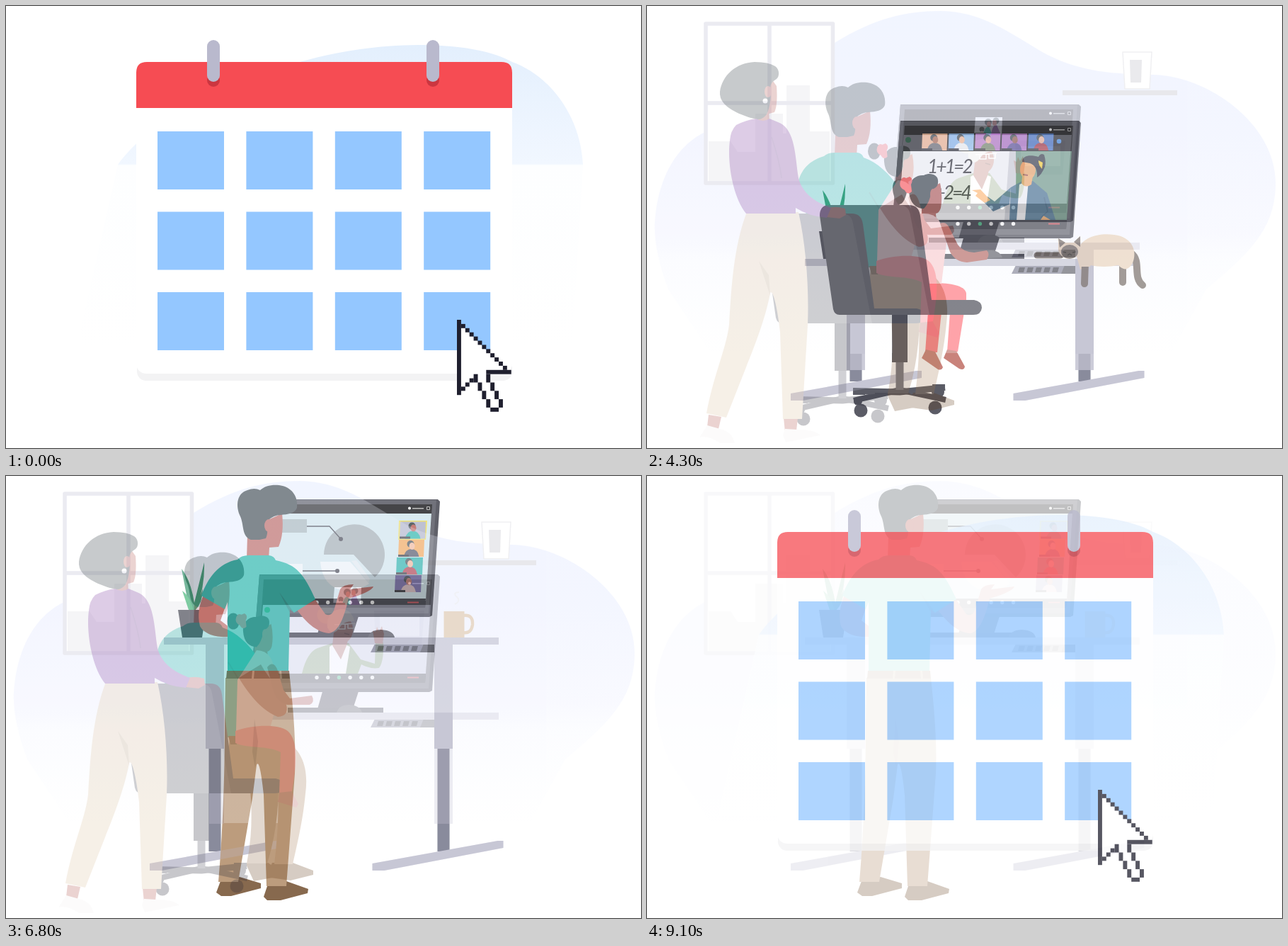
These frames come from a looping animation (897x624 px, 9.2 s). An HTML page:

```html
<!DOCTYPE html>
<html lang="en">
<head>
<meta charset="utf-8">
<title>Calendar and desk scenes</title>
<style>
html, body { margin: 0; width: 100%; height: 100%; overflow: hidden; background: #fff; }
svg { display: block; width: 897px; height: 624px; }
text { font: italic 26.5px Lato, "Open Sans", sans-serif; letter-spacing: -3px; }
</style>
</head>
<body>
<svg id="stage" viewBox="0 0 897 624" xmlns="http://www.w3.org/2000/svg"></svg>
<script>
const ink = '#252633', slate = '#44454f', hair = '#263238', skin = '#b3524c', steel = '#bcbbcd',
  iron = '#6f7186', teal = '#04ab9c', rose = '#ff5d66', pink = '#f9c6c9', tan = '#a67c52',
  brown = '#603813', sand = '#ddc4a4', purple = '#7c3a9e', fur = '#5b5049', coat = '#e6ccb0';

const P = (d, fill) => `<path d="${d}" fill="${fill}"/>`;
const L = (d, stroke, w, cap = 'butt') =>
  `<path d="${d}" fill="none" stroke="${stroke}" stroke-width="${w}" stroke-linecap="${cap}" stroke-linejoin="round"/>`;
const R = (x, y, w, h, fill, r = 0) =>
  `<rect x="${x}" y="${y}" width="${w}" height="${h}" rx="${r}" fill="${fill}"/>`;
const E = (x, y, rx, ry, fill) => `<ellipse cx="${x}" cy="${y}" rx="${rx}" ry="${ry}" fill="${fill}"/>`;
const C = (x, y, r, fill) => E(x, y, r, r, fill);
const G = (transform, body) => `<g transform="${transform}">${body}</g>`;
const move = (x, y, body) => G(`translate(${x} ${y})`, body);
const fade = (id, stops) =>
  `<linearGradient id="${id}" gradientUnits="userSpaceOnUse" x1="0" y1="0" x2="0" y2="500">` +
  stops.map(([y, c]) => `<stop offset="${y / 500}" stop-color="${c}"/>`).join('') + '</linearGradient>';

const defs = '<defs>' +
  fade('sky', [[55, '#e3effd'], [130, '#eaf3fe'], [223, '#f1f7ff'], [225, '#fdfeff'], [480, '#fff']]) +
  fade('wall', [[7, '#eff3ff'], [180, '#f1f4ff'], [320, '#f7f8ff'], [360, '#fbfcff'], [490, '#fff']]) + '</defs>';

// ---- calendar ----
function cursor() {
  const u = 5.9, cells = [[0, 0, 1, 18], [7, 12, 6, 1], [7, 13, 1, 2], [8, 15, 1, 2], [9, 17, 1, 2],
    [10, 19, 1, 2], [8, 21, 2, 1], [7, 19, 1, 2], [6, 17, 1, 2], [5, 15, 1, 2], [4, 13, 1, 2],
    [3, 14, 1, 1], [2, 15, 1, 1], [1, 16, 1, 1]];
  for (let i = 1; i < 12; i++) cells.push([i, i, 1, 1]);
  return move(637, 443, P('M3 3L71 73H44V88L62 124H45L27 77L3 100Z', '#fff') +
    cells.map(c => R(...c.map(n => +(n * u).toFixed(1)), '#1f1f2e')).join(''));
}

function calendar() {
  let s = P('M158 224C200 165 300 110 415 79C480 60 540 55 590 55C650 56 690 65 715 79C768 98 812 155 815 225L800 480H100Z', 'url(#sky)') +
    R(185, 480, 530, 49, '#f3f3f4', 13) + R(184, 79, 531, 440, '#fff', 14) +
    P('M184 144V94Q184 79 199 79H700Q715 79 715 94V144Z', '#f64c53');
  for (const x of [293, 603]) s += C(x, 105, 9, '#cb3640') + R(x - 9, 48, 18, 59, '#b9b9cd', 9);
  for (let i = 0; i < 12; i++)
    s += R(214 + i % 4 * 125.4, 177 + Math.floor(i / 4) * 113.5, 94, 82, '#94c7ff');
  return s + cursor();
}

// ---- shared room ----
const room = () =>
  P('M11 305C15 240 45 195 82 178C150 150 210 85 265 52C320 18 365 7 415 7C470 8 505 33 555 63C610 95 665 96 715 97C790 98 888 165 888 250C888 315 850 350 790 400L740 490H90L30 400Q9 345 11 305Z', 'url(#wall)') +
  R(83, 25, 180, 226, '#fff') +
  P('M87 250V191H118L128 206H153V152H192V180H197V112H230V177H258V250Z', '#f4f4f6') +
  L('M83 25H262.5V250H83ZM173 25V250M83 137H262', '#e7e7ef', 5.5) +
  R(587, 119, 162, 7, '#e4e4e9') + P('M672 65H713L710 117H675Z', '#fff') +
  L('M672 65H713L710 117H675Z', '#ededf0', 1.5) + P('M682 76H699L698 108H683Z', '#e6e6ea');

// The parts below are drawn for a desk top at y = 357 and shifted to fit.
const plant = () =>
  P('M259 318L248 260Q261 276 266 308L280 251Q281 285 270 312L278 288Q278 308 267 319Z', '#0d8050') +
  P('M258 318L249 291Q261 300 265 319Z', '#1da65d') + P('M243 318H283L277 357H249Z', ink);

function desk(y) {
  const end = y + 157;
  let s = '';
  for (const x of [282, 605])
    s += R(x + 4.5, end, 17, 530 - end, iron) + R(x, y + 9, 26, 148, steel);
  for (const x of [203, 517.5])
    s += P(`M${x} 547L${x + 177} 515H${x + 185}V525L${x + 17} 557H${x}Z`, steel);
  let tray = P('M521 366H605V378H515Z', iron) + P('M590 366H605V378H585Z', slate);
  for (let i = 0; i < 5; i++) tray += P(`M${526 + i * 12} 369h8l-2 7h-8Z`, ink);
  return s + move(0, y - 357, tray + plant()) + R(223, y, y === 357 ? 465 : 473, 10, steel);
}

function monitor(y, screen) {
  let s = P('M448 324H499L490 352H440Z', '#2b2b38') + R(398, 350, 135, 7, ink) +
    P('M358 162H610L613 165L602 326L598 328H345Z', '#2a2b38') +
    P('M358 163H608L597 323H345Z', '#42434f') + P('M364 169H602L592 315H354Z', '#08080b') + screen +
    P('M357 302H593L592 315H354Z', '#20212c');
  for (let i = 0; i < 6; i++) s += C(439 + i * 15.7, 307.5, 2.7, i === 2 ? '#2fb573' : '#eee');
  s += R(567, 306.5, 16, 2, '#c8323d') + C(570, 174.5, 2, '#fff') + R(574, 174, 16, 1.5, '#aaa') +
    L('M594.5 172.5H598.5V176.5H594.5Z', '#aaa', 1);
  return move(0, y - 357, s);
}

function bust(x, y, w, bg, shirt, face = skin, top = hair) {
  return move(x, y, P(`M1 0H${w}L${w - 1} 24H0Z`, bg) +
    P(`M${w / 2 - 11} 24Q${w / 2 - 8} 13 ${w / 2} 13Q${w / 2 + 9} 13 ${w / 2 + 11} 24Z`, shirt) +
    C(w / 2 - 1, 6, 5, top) + E(w / 2 + 1, 9, 4, 5, face) + R(0, 21, 15, 3, '#17171f'));
}

const chair = () =>
  L('M291 543.5L357 545L421 538.5', ink, 9) + L('M292 557L357 542L422 556', ink, 8) +
  R(403, 534, 18, 9, ink) + R(291, 540, 17, 9, ink) +
  C(302, 571, 9.5, ink) + C(407, 567, 9.5, ink) + C(411, 545, 9, ink) + C(298, 558, 6, ink) +
  R(351.5, 500, 11, 42, '#4b4c5a') + R(346, 434, 22, 69, ink) +
  P('M350 281H370Q384 281 386 296L402 415H462Q473 417 473 426Q472 436 461 436H380Z', ink) +
  P('M256 281H358Q370 282 372 295L399 436H272Q265 436 263 428L244 296Q244 282 256 281Z', slate);

const girlHead = () =>
  P('M388 278L398 258L414 250Q418 268 415 285Q413 292 408 293L409 305H388Z', skin) +
  P('M370 262C369 246 380 238 391 239C401 234 411 239 411 246Q412 255 405 258C400 261 402 275 391 286C380 286 371 278 370 262Z', hair) +
  E(404, 266, 4, 8, skin);
const bow = () =>
  P('M358 247Q361 240 366 243L371 241Q377 244 373 252L374 262Q368 268 364 260Q355 256 358 247Z', '#f8555d');
const ponytail = () =>
  P('M350 247C361 240 369 248 368 258C366 270 362 281 355 280C346 268 345 252 350 247Z', hair);

const manHead = () =>
  P('M341 84L370 62L390 53Q393 82 385 100L372 101L371 118H340Z', skin) +
  P('M346 90C332 85 337 68 330 55C324 40 327 24 341 20Q351 16 359 20C366 13 380 11 391 14C405 18 413 30 411 45C408 53 398 54 388 55Q378 55 370 63C368 72 371 80 367 88L358 90Z', hair) +
  E(371, 70, 6, 9, skin);

// ---- lesson ----
function lessonScreen() {
  const cells = [['#f3b085', '#59595f', '#a85c3e'], ['#7db3f0', '#eef2fa', '#f4b08d'], ['#b067c2', '#5b6d55', '#f0a58a'],
    ['#a861c0', '#4a3d8c', '#8a4a3a'], ['#2f62bd', '#a1202c', '#f0b090']];
  return P('M362 205H521V302H355Z', '#fff') + P('M512 205H521V302H505Z', '#d4d5da') +
    P('M521 205H600L593 302H521Z', '#6a9a83') +
    cells.map((c, i) => bust(388 + i * 37.5, 180, 36.5, ...c)).join('') + C(582, 191, 3.3, '#2b7de0') +
    '<text x="396" y="236" fill="#17171d">1+1=2</text><text x="394" y="273" fill="#17171d">2+2=4</text>' +
    P('M512 302L514 256L530 247H545L565 264L577 302Z', '#3d6c8c') + P('M526 252L539 246L534 302H522Z', '#fff') +
    P('M514 256L512 280L489 290L474 275L481 269L491 276Z', '#3d6c8c') +
    P('M485 274L471 259L459 260L467 264L464 268L477 278ZM531 234H546L543 252Q534 258 529 250ZM556 302L560 296L570 302Z', '#fdad62') +
    L('M561 270L566 290L556 299', '#2f587a', 1.5) + E(538, 231, 11, 14, '#fdad62') +
    P('M530 220C530 210 543 210 553 213Q556 207 561 210Q564 220 562 227Q557 239 551 242Q552 226 541 222Z', '#1f2633') +
    P('M553 218L559 221L558 230Q553 225 553 218Z', '#ffd21f') + L('M531 238L538 239', '#9c4238', 2);
}

const cat = () =>
  L('M685 350C698 360 686 384 700 394', fur, 10, 'round') + L('M672 358L672 390', fur, 10, 'round') +
  P('M606 350C612 325 640 320 660 323C685 326 692 345 687 360C683 371 675 376 666 366Q645 370 626 366L612 372Z', coat) +
  L('M619 362L618 392', fur, 10, 'round') + P('M612 352Q620 340 630 352L626 368H613Z', coat) +
  L('M551 352H584', fur, 9, 'round') + P('M581 328L591 334H603L612 325L613 348Q606 357 595 357Q584 355 581 345Z', coat) +
  P('M581 328L591 334L583 341ZM612 325L603 333L612 340Z', fur) + E(597, 347, 12, 10, fur) +
  L('M587 347L592 348M601 348L606 347M594 352L597 350L600 352', '#29231f', 1.3);

const lesson = () => room() + monitor(357, lessonScreen()) + desk(357) + cat() +
  P('M397 432H416L410 489H393ZM428 432H448L439 488H424Z', rose) +
  P('M394 485L407 488L418 510Q416 515 411 513L388 497ZM424 485L437 487L449 509Q448 515 441 512L419 497Z', '#b85a50') +
  P('M392 392C425 389 450 394 451 406V418H392Z', rose) +
  ponytail() + girlHead() + bow() + P('M380 294Q403 290 412 302L424 326L416 392H396Z', pink) +
  P('M470 357Q472 345 487 345Q499 346 502 355Z', slate) +
  P('M414 307Q423 303 428 315L439 337Q446 347 462 348L480 345Q485 350 480 358L452 362Q435 361 428 347Z', '#a94f49') + chair();

// ---- family call ----
const familyScreen = () =>
  P('M363 205H600L593 302H355Z', '#c3c5dc') + P('M520 213H591L587 261H522Z', '#b4b7d1') + R(528, 221, 56, 28, '#cfd1e4') +
  P('M464 180H502L501 205H462Z', '#dfe4f2') + C(473, 197, 3.5, hair) + C(482, 187, 5, hair) + C(493, 185, 4.5, hair) +
  P('M475 205Q477 193 483 193L488 205Z', teal) + P('M486 205Q488 190 494 191L500 205Z', purple) +
  E(483, 190, 3, 4, skin) + E(491, 188, 3, 4, skin) + P('M467 205L473 199L479 205Z', pink) + R(462, 202, 17, 3, '#17171f') +
  C(369, 212, 4, '#16a660') +
  P('M418 302Q425 272 440 266L461 259H484L501 282L521 288L522 258H533Q534 285 527 294Q515 296 502 289L497 302Z', '#708c5e') +
  P('M457 264L469 257L486 264L480 302H457Z', '#fff') + P('M461 262L463 244H484L482 260L473 282Z', '#a95d55') +
  P('M521 259L518 241L522 243L524 236L527 242L531 235L534 246L532 260Z', '#a95d55') + E(477, 240, 13, 18, '#a95d55') +
  C(452, 219, 12.5, '#d7d7d7') + P('M454 237C452 217 466 209 478 211Q490 215 492 228Q478 227 472 236Q465 247 457 242Z', '#e5e5e5') +
  L('M464 233L494 231M470 233V239H479V232M483 232V238H492V231', '#fff', 1.5) + L('M478 245L485 247', '#68332f', 1.5);

const woman = () =>
  P('M87 577L105 580L101 597L85 594ZM193 581H213L211 600L195 602Z', skin) +
  P('M85 592L103 597Q120 600 124 617H103Q86 606 74 609ZM195 597L212 598Q238 598 245 606L216 612L196 616L192 606Z', '#f4f3f3') +
  P('M141 291H214C225 340 229 400 227 450L219 583H192L188 460C184 425 178 400 174 405C168 440 150 485 140 510L112 581L84 575C94 520 112 484 116 450C119 400 122 340 141 291Z', sand) +
  P('M158 360L172 380L174 409Z', '#bea684') + P('M153 144H172L173 164H152Z', skin) +
  P('M176 103L183 113Q185 139 180 150L169 153V127Z', skin) +
  P('M103 121C106 98 126 80 152 79Q172 79 181 85C188 90 187 100 183 103Q174 108 174 116C176 126 174 143 169 153Q163 161 155 160C140 157 118 148 109 138Q102 130 103 121Z', hair) +
  E(171, 121, 5, 8, skin) + C(167, 134, 3.5, '#fff') +
  P('M251 287Q264 281 280 286L281 295L272 300L254 298Z', skin) +
  P('M126 168Q140 161 154 159Q164 165 173 159L185 164C207 172 209 203 213 237C216 263 237 277 260 285L254 299Q229 297 210 285V293H140C121 270 113 220 117 190Q118 176 126 168Z', purple) +
  L('M176 185Q188 222 190 243', '#67308a', 1.5);

const family = () => room() + monitor(334, familyScreen()) + desk(334) +
  P('M467 334Q470 323 485 323Q500 324 503 334Z', slate) +
  P('M338 546H370L388 558L382 566L350 572Z', brown) + P('M345 442H385Q384 500 369 547H340Q350 500 345 442Z', '#8f6943') +
  P('M376 546H405L434 557V563L402 571L366 566Z', brown) +
  P('M316 370H388C422 385 427 418 423 448C419 490 411 520 405 548H379Q386 490 384 448L385 428H310Z', tan) +
  move(-75, 95, manHead()) +
  P('M213 250C219 226 234 217 250 212Q255 207 266 207H297Q304 208 306 214C329 222 346 241 361 264L328 286L326 369H250L225 295Z', teal) +
  L('M314 263L328 286', '#038b80', 2) + P('M314 367H326V379H317Z', brown) +
  E(321, 205, 9, 11.5, hair) + G('translate(2 -16) scale(.9)', girlHead()) + G('translate(3 -23) scale(.9)', bow()) +
  P('M327 288L354 246Q373 246 378 268L386 309L373 356L325 360Z', pink) +
  P('M329 285L360 266C371 286 390 304 396 323Q400 339 384 340C363 332 344 310 329 285Z', skin) +
  P('M369 270Q378 259 384 275L392 302L401 314L432 310Q437 319 429 323L397 323Q381 318 377 300Z', '#a94f49') +
  move(-81, 12, chair()) +
  P('M387 444H403L413 463L410 468L384 460Z', skin) +
  P('M324 360C350 351 385 350 398 360C413 374 411 405 404 445L386 447L388 390C370 380 340 385 324 377Z', rose) +
  woman();

// ---- standing presentation ----
const chartScreen = () =>
  P('M363 182H601L593 305H355Z', '#cde3eb') +
  P('M449 240A43 43 0 1 1 521 272L491 240Z', '#95a2a7') +
  P('M444 250H486L513 281Q497 292 478 291Q447 286 444 250Z', '#eef4f7') + P('M488 249L495 248L514 274L512 280Z', '#dfe9ee') +
  R(388, 190, 37, 19, '#9caeb4') + R(390, 253, 29, 20, '#edf4f7') +
  L('M425 200H457L473 218M419 263H468', ink, 1.3) + C(473, 218, 3, ink) + C(468, 263, 3, ink) +
  P('M555 192H595L593 219H554Z', '#ead94a') +
  bust(556, 193.5, 37, '#a9adc4', teal) + bust(554, 219, 37, '#f49a3e', '#35384b', '#f4b08d') +
  bust(551, 244, 38, '#08a69e', '#a3202f', '#efab8c') + bust(549, 269, 38, '#675ba3', '#d9b8bb', '#b9655a');

const standing = () => room() + monitor(228, chartScreen()) + desk(228) +
  P('M511 228Q514 217 530 217Q547 218 549 228Z', '#353640') +
  L('M646 197Q660 195 659 210Q657 223 646 221', sand, 4.5) + R(618.5, 191, 29, 37, sand) +
  L('M634 181Q644 176 635 169Q632 164 640 164', '#ececf0', 2) +
  P('M303 572L330 566L360 575V582L318 593H304L297 588ZM369 579L396 572L427 583L426 589L388 599H369L364 594Z', brown) +
  P('M310 285H401C406 330 410 380 408 420L396 579H368L364 450C361 420 357 400 354 408L348 455L328 573H300C308 480 309 400 309 350Z', tan) +
  P('M351 343L356 375L352 412L348 390Z', '#8c6641') +
  P('M279 168L310 184L303 204L315 213V227C300 228 281 225 274 212C270 196 273 182 279 168Z', skin) +
  P('M410 188L437 175L451 195Q459 199 463 190L472 160Q476 153 491 153L486 160L519 156Q518 161 497 169L484 173C478 197 471 220 456 222C437 220 424 206 410 188Z', skin) +
  manHead() +
  P('M327 118Q332 112 343 112H371Q379 113 381 119C411 125 421 139 437 174L407 193L401 188L399 276H313V178L309 188L276 169C285 144 300 123 327 118Z', teal) +
  P('M386 164L407 193L401 188V193Z', '#038b80') +
  P('M312 275H400L401 286H311Z', brown) + P('M348 275H351L350 286H347ZM386 275H389L390 286H387Z', tan);

// ---- timeline ----
// Clear layers from back to front, so covered parts stay faint while two blend.
const layers = [lesson, standing, family, calendar];
const order = [calendar, lesson, family, standing];
const stage = document.getElementById('stage');
stage.innerHTML = defs + layers.map(draw => `<g>${draw()}</g>`).join('');
const groups = stage.querySelectorAll(':scope > g');
const scenes = order.map(draw => groups[layers.indexOf(draw)]);
const loop = 9200, starts = [2000, 4300, 6600, 8900];

function render(t) {
  const now = starts.findIndex(s => t < s + 300);
  const since = t - starts[now];
  const mix = since < 0 ? 0 : (Math.floor(since / 100) + 1) / 4;
  scenes.forEach((g, i) => {
    const alpha = i === now ? 1 - mix : i === (now + 1) % 4 ? mix : 0;
    g.style.display = alpha ? '' : 'none';
    g.style.opacity = alpha;
  });
}

const begin = performance.now();
function tick() {
  render((performance.now() - begin) % loop);
  requestAnimationFrame(tick);
}
tick();
</script>
</body>
</html>
```
